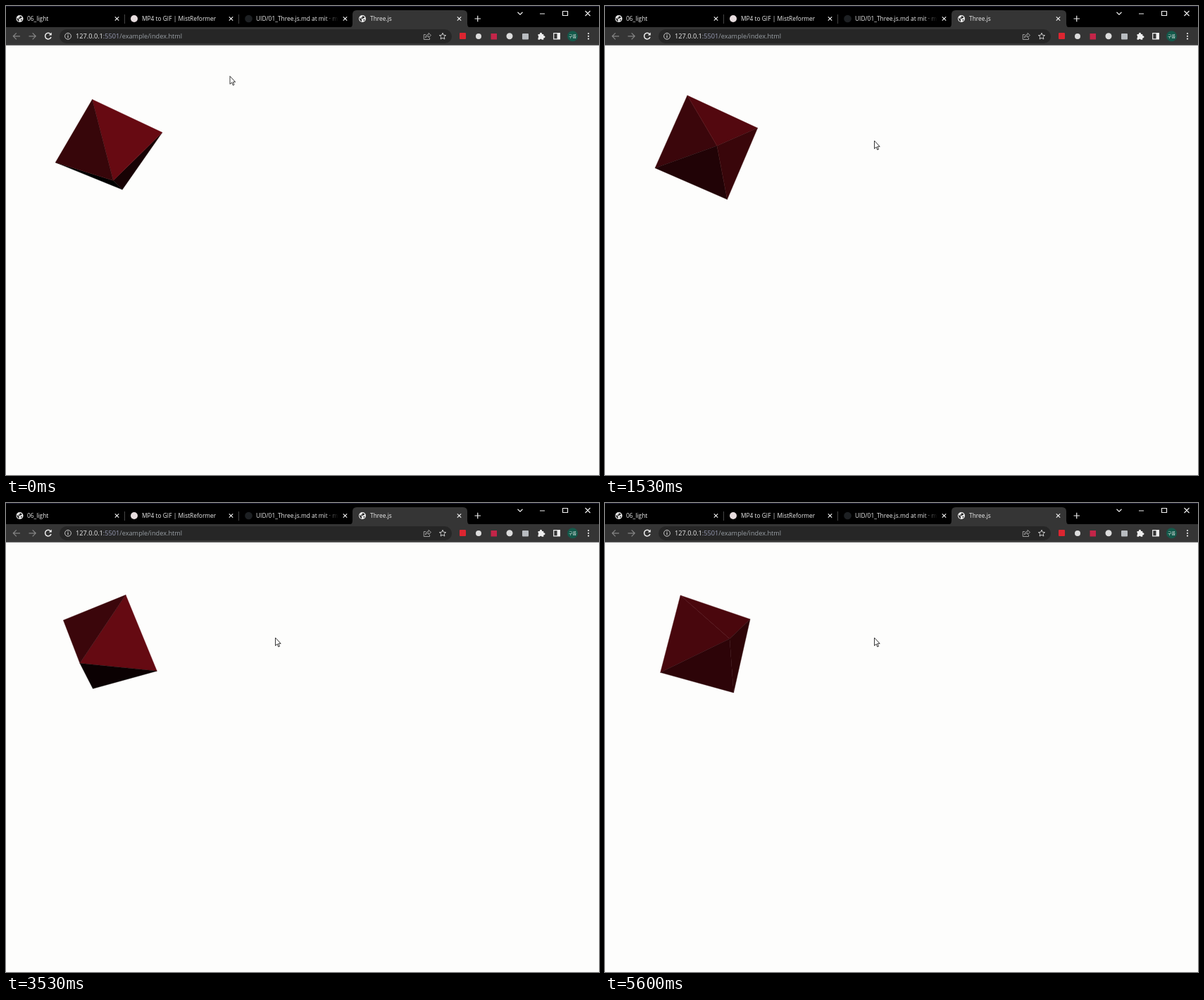
An HTML page that plays this animation: 842x665 px, repeating every 5.63 s.

```html
<!DOCTYPE html>
<html lang="en">
<head>
<meta charset="utf-8">
<title>Rotating octahedron</title>
<style>
html, body { margin: 0; width: 100%; height: 100%; overflow: hidden; background: #fdfdfc; }
svg { display: block; }
text { font-family: "Open Sans", "Noto Sans", sans-serif; font-size: 8.4px; fill: #eee; white-space: pre; }
.line { fill: none; stroke: #eee; stroke-width: 1.2; }
</style>
</head>
<body>
<svg width="842" height="665" viewBox="0 0 842 665">
  <defs>
    <linearGradient id="fade">
      <stop offset="0" stop-color="#000" stop-opacity="0"/>
      <stop offset="1" stop-color="#000"/>
    </linearGradient>
    <g id="globe">
      <circle r="5" fill="#eee"/>
      <path d="M-4-1.5L-1 1.2V4C-3 3.5-4.2 1-4-1.5ZM0-4L3.2-2.6L2.2-.6H0L-.8 1L-2-1.2L.2-2ZM1.2 1H3.6L2.4 3.2Z" fill="#222"/>
    </g>
    <path id="close" class="line" d="M-2.7-2.7L2.7 2.7M2.7-2.7L-2.7 2.7"/>
  </defs>

  <!-- tab strip -->
  <rect width="842" height="31" fill="#000"/>
  <rect width="842" height="1" fill="#15152a"/>
  <path d="M486 31Q492 31 492 25V12Q492 6 498 6H649Q655 6 655 12V25Q655 31 661 31Z" fill="#353535"/>
  <path d="M168.5 12V25M330.5 12V25" stroke="#444"/>
  <use href="#globe" x="19.500" y="18"/>
  <circle cx="182" cy="18" r="5" fill="#e6dcde"/>
  <circle cx="344.500" cy="18" r="5.300" fill="#1d2023"/>
  <use href="#globe" x="506" y="18"/>
  <text x="30" y="21">06_light</text>
  <text x="193" y="21">MP4 to GIF | MistReformer</text>
  <svg x="355" y="8" width="117" height="20"><text y="13">UID/01_Three.js.md at mit · mkovan</text></svg>
  <rect x="452" y="8" width="20" height="20" fill="url(#fade)"/>
  <text x="517" y="21">Three.js</text>
  <use href="#close" x="157.500" y="18"/>
  <use href="#close" x="319.500" y="18"/>
  <use href="#close" x="481.500" y="18"/>
  <use href="#close" x="643.500" y="18"/>
  <path class="line" d="M665.500 18H674M669.750 13.800V22.200" stroke-width="1.500"/>
  <path class="line" d="M726.500 8.800L730 12.200L733.500 8.800M758 11H765M790.500 7.500H797.500V13.500H790.500ZM822.500 7L829.500 14M829.500 7L822.500 14" stroke-width="1"/>

  <!-- toolbar -->
  <rect y="30" width="842" height="25.500" fill="#353535"/>
  <rect x="76" y="33" width="557" height="20" rx="10" fill="#262626"/>
  <rect y="54.500" width="842" height="1.200" fill="#4a4a4a"/>
  <g class="line">
    <path d="M20 42.800H10.500M14.800 38.300L10.300 42.800L14.800 47.300M32.500 42.800H42M37.700 38.300L42.200 42.800L37.700 47.300" stroke="#858585"/>
    <path d="M63.300 40A4.300 4.300 0 1 0 64 44" stroke-width="1.500"/>
    <circle cx="88" cy="42.800" r="4.400" stroke="#ccc" stroke-width="1"/>
    <path d="M88 42V45.300M88 40.100V41.200" stroke="#ccc"/>
    <path d="M596 40.500H593.300V47.500H601.500V45M595.500 45Q596 40.500 600 40.500V38.300L603.500 41.500L600 44.700V42.600Q597.300 42.500 595.500 45Z" stroke="#aaa" stroke-width=".9"/>
    <path d="M620 38.200L621.300 41.300L624.600 41.600L622.100 43.800L622.900 47L620 45.300L617.100 47L617.900 43.800L615.400 41.600L618.700 41.300Z" stroke="#ccc" stroke-width="1"/>
    <path d="M777.700 38.700H786.300V46.800H777.700Z"/>
  </g>
  <path d="M64.800 37.500V41.500H60.800Z" fill="#eee"/>
  <text x="99" y="46" font-size="9.200" style="font-size:9.2px;fill:#9aa0a6"><tspan fill="#eee">127.0.0.1</tspan><tspan fill="#9c9fb8">:5501</tspan>/example/index.html</text>
  <rect x="644" y="38" width="9" height="9" rx="1" fill="#dc2530"/>
  <circle cx="671" cy="43" r="4" fill="#ddd"/>
  <rect x="688.500" y="39" width="8.500" height="8.500" fill="#c42548"/>
  <circle cx="715" cy="42.800" r="4.500" fill="#ddd"/>
  <rect x="733" y="39" width="9" height="8.500" rx="1" fill="#b8bcc0"/>
  <path d="M755.500 40H758A1.600 1.600 0 1 1 761 40H763.300V42.300A1.600 1.600 0 1 1 763.300 45.300V47.800H760.800A1.600 1.600 0 0 0 757.800 47.800H755.500V45A1.600 1.600 0 0 0 755.500 42.300Z" fill="#eee"/>
  <rect x="782.500" y="38.500" width="4" height="8.500" fill="#eee"/>
  <circle cx="804.500" cy="42.700" r="7.500" fill="#14594a"/>
  <text x="804.500" y="45" text-anchor="middle" style="font:6px 'Noto Sans CJK KR','Noto Sans CJK',sans-serif">구름</text>
  <g fill="#eee"><circle cx="827" cy="39" r="1.100"/><circle cx="827" cy="42.800" r="1.100"/><circle cx="827" cy="46.600" r="1.100"/></g>

  <g id="solid" stroke-width=".4" stroke-linejoin="round"></g>
  <path id="cursor" d="M0 0V11.300L2.600 8.900L4.300 12.900L6 12.200L4.300 8.300H7.700Z" fill="#fff" stroke="#222" stroke-width=".9"/>
</svg>
<script>
const LOOP = 5630, FRAME = 100 / 3;
const CENTER = [145.3, 200.8], RADIUS = 79, DEPTH = 0.13;
const LIGHT = [26, 31, 97];
// [ms, radians]: a nearly steady spin, a little quicker at the start
const SPIN = [[0, 1.855], [1067, 3.602], [2033, 5.075], [2933, 6.386], [4133, 8.175], [5000, 9.478], [5600, 10.36]];
const solid = document.getElementById('solid');
const cursor = document.getElementById('cursor');

const dot = (a, b) => a[0] * b[0] + a[1] * b[1] + a[2] * b[2];

function angleAt(t) {
  const i = Math.max(1, SPIN.findIndex(p => p[0] >= t));
  const [t0, a0] = SPIN[i - 1], [t1, a1] = SPIN[i];
  return a0 + (a1 - a0) * (t - t0) / (t1 - t0);
}

// Axes after equal Euler turns about x, y and z
function axesAt(angle) {
  const c = Math.cos(angle), s = Math.sin(angle);
  return [
    [c * c, c * s + s * s * c, s * s - c * c * s],
    [-c * s, c * c - s ** 3, s * c + c * s * s],
    [s, -s * c, c * c]
  ];
}

function project([x, y, z]) {
  const k = RADIUS / (1 - DEPTH * z);
  return (CENTER[0] + x * k).toFixed(2) + ',' + (CENTER[1] - y * k).toFixed(2);
}

function drawSolid(angle) {
  const axes = axesAt(angle);
  let faces = '';
  for (let n = 0; n < 8; n++) {
    const corners = axes.map((axis, i) => axis.map(v => n >> i & 1 ? -v : v));
    const normal = [0, 1, 2].map(i => corners.reduce((sum, p) => sum + p[i], 0) / Math.sqrt(3));
    if (normal[2] <= DEPTH / Math.sqrt(3)) continue;
    const red = Math.max(0, dot(normal, LIGHT));
    const color = `rgb(${[red, red * 0.1, red * 0.18].map(Math.round)})`;
    faces += `<polygon points="${corners.map(project).join(' ')}" fill="${color}" stroke="${color}"/>`;
  }
  solid.innerHTML = faces;
}

function moveCursor(t) {
  const u = Math.min(1, t / 550), e = u * u * (3 - 2 * u);
  cursor.setAttribute('transform', `translate(${318 + 64.5 * e} ${99.5 + 91.5 * e})`);
}

function draw(now) {
  const tick = Math.floor(now % LOOP / 10) * 10;
  const t = Math.floor((tick + 9.9) / FRAME) * FRAME;
  drawSolid(angleAt(Math.min(t, 5600)));
  moveCursor(t);
}

let start;
function loop(now) {
  start ??= now;
  draw(now - start);
  requestAnimationFrame(loop);
}
draw(0);
requestAnimationFrame(loop);
</script>
</body>
</html>
```
